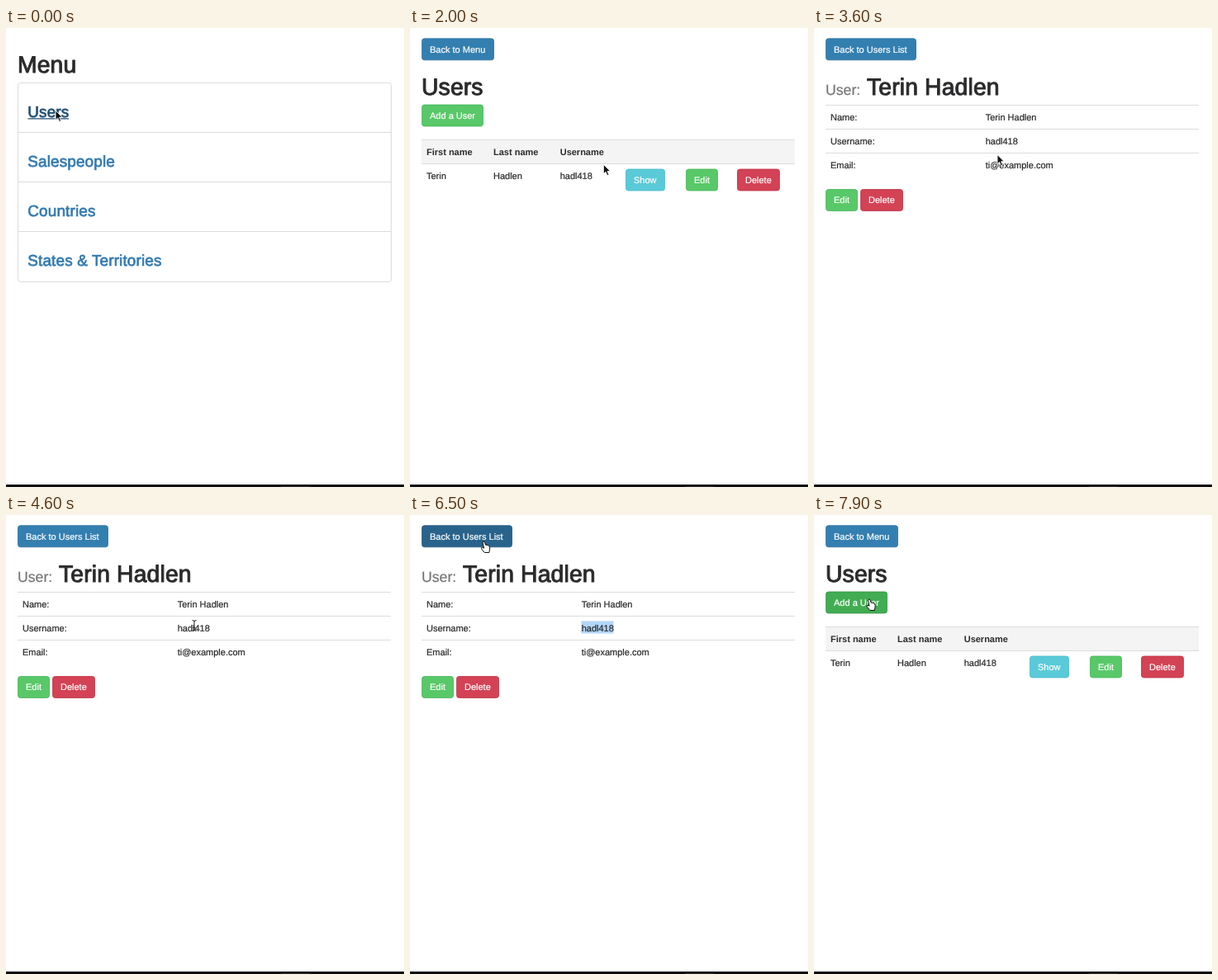
An HTML page for the animation above (8000 ms loop, 482x556 px).

```html
<!DOCTYPE html>
<html lang="en">
<head>
<meta charset="utf-8">
<title>User admin</title>
<style>
  html, body { margin: 0; width: 100%; height: 100%; overflow: hidden; background: #fff; }
  svg { display: block; font: 11px "Liberation Sans", Arial, sans-serif; fill: #2b2b2d; text-rendering: geometricPrecision; }
  text { white-space: pre; stroke: currentColor; stroke-width: .22px; color: #2b2b2d; }
  .h1 { font-size: 28.3px; letter-spacing: .15px; stroke-width: 1px; }
  .small { font-size: 17.7px; fill: #777; color: #777; }
  .link { font-size: 18.9px; letter-spacing: .15px; fill: #337ab0; color: #337ab0; stroke-width: .7px; }
  .link.over { fill: #214f72; color: #214f72; }
  .th { font-weight: bold; stroke: none; }
  .btn text { fill: #fff; color: #fff; }
  .rule { stroke: #dcdcdc; fill: none; }
</style>
</head>
<body>
<svg id="stage" width="482" height="556" viewBox="0 0 482 556"></svg>
<script>
const LOOP = 8000, STEP = 100;
const first = 'Terin', last = 'Hadlen', login = 'hadl418', mail = 'ti@example.com';

// fill and border per button state
const colors = {
  blue: ['#337fb0', '#2d709d'], blueOver: ['#28638b', '#22567a'], blueDown: ['#224f6f', '#183c56'],
  green: ['#58c868', '#4bb45b'], greenOver: ['#42ac53', '#389747'],
  cyan: ['#5acad8', '#48bccb'], cyanOver: ['#34b6c7', '#2aa5b6'], cyanDown: ['#20a5b5', '#188391'],
  red: ['#d34255', '#bf3448']
};

const text = (x, y, s, cls = '') => `<text x="${x}" y="${y}" class="${cls}">${s}</text>`;
const rule = y => `<path class="rule" d="M14 ${y}H466"/>`;
const button = (x, y, w, label, color, id = '') => {
  const [fill, edge] = colors[color];
  return `<g class="btn"><rect id="${id}" x="${x + .5}" y="${y + .5}" width="${w - 1}" height="26" rx="3"
    fill="${fill}" stroke="${edge}" stroke-width=".8"/>${text(x + 10, y + 17.3, label)}</g>`;
};

const links = ['Users', 'Salespeople', 'Countries', 'States &amp; Territories'];
const menu = text(14, 53.6, 'Menu', 'h1') +
  '<rect class="rule" x="14.5" y="66.5" width="452" height="241" rx="3"/>' +
  [126.5, 186.5, 246.5].map(rule).join('') +
  links.map((s, i) => text(26.3, 108 + 60 * i, s, i ? 'link' : 'link over')).join('') +
  '<path d="M26.5 109.8H76" stroke="#214f72" stroke-width="1.2"/>';

const columns = [[20, 'First name', first], [101, 'Last name', last], [181.7, 'Username', login]];
const list = button(14, 12.3, 88, 'Back to Menu', 'blue') +
  text(14, 80.5, 'Users', 'h1') +
  button(14, 92.5, 75, 'Add a User', 'green', 'add') +
  '<path d="M14 135H466V165H14z" fill="#f4f4f4"/>' + rule(135.5) + rule(164.5) +
  columns.map(([x, head, cell]) => text(x, 154, head, 'th') + text(x, 183, cell)).join('') +
  button(261, 170.5, 48, 'Show', 'cyan', 'show') +
  button(334, 170.5, 39, 'Edit', 'green') +
  button(396, 170.5, 52, 'Delete', 'red');

const rows = [['Name:', first + ' ' + last], ['Username:', login], ['Email:', mail]];
const user = button(14, 12.3, 110, 'Back to Users List', 'blue', 'back') +
  text(14, 80.5, 'User:', 'small') + text(64, 80.5, first + ' ' + last, 'h1') +
  '<rect id="mark" x="207.5" y="128.5" width="39" height="15" fill="#b2d6fb"/>' +
  rows.map(([k, v], i) => rule(93.5 + 29 * i) + text(20, 112 + 29 * i, k) + text(207.7, 112 + 29 * i, v)).join('') +
  button(14, 195, 39, 'Edit', 'green') + button(56, 195, 52, 'Delete', 'red');

const cursors = {
  arrow: '<path d="M0 0V11.5L2.7 9 4.6 13.4 6.6 12.5 4.7 8.2H8.3z" fill="#111" stroke="#fff" stroke-width=".9"/>',
  hand: `<path d="M-1.4 1.2Q-1-.6.6.2L2.2 4.4 3.6 4.2 5 4.7 6.4 5.4Q7.6 7 7 10L6.3 13.5H.8
    L-2.7 9.3Q-3.8 7.4-2 7.2L0 8.2z" fill="#fff" stroke="#111"/>`,
  beam: `<path d="M-2.5-6.5Q0-6.5 0-4.5Q0-6.5 2.5-6.5M0-4.5V4.5M-2.5 6.5Q0 6.5 0 4.5Q0 6.5 2.5 6.5M-1.5 2.5H1.5"
    fill="none" stroke="#222"/>`
};

const group = (id, body) => `<g id="${id}">${body}</g>`;
const stage = document.getElementById('stage');
stage.innerHTML = group('menu', menu) + group('list', list) + group('user', user) +
  '<path d="M0 553H482V556H0z" fill="#08080a"/><path d="M333 554.5H368V556H333z" fill="#222"/>' +
  group('pointer', Object.entries(cursors).map(([id, body]) => group(id, body)).join(''));
const $ = id => document.getElementById(id);

// [time, value] tracks that switch hard
const views = [[0, 'menu'], [1100, 'list'], [2900, 'user'], [7500, 'list']];
const kinds = [[0, 'arrow'], [2200, 'hand'], [2600, 'arrow'], [4300, 'beam'], [5600, 'arrow'],
  [6200, 'hand'], [7100, 'arrow'], [7800, 'hand']];
const states = {
  add: [[0, 'green'], [7800, 'greenOver']],
  show: [[0, 'cyan'], [2200, 'cyanOver'], [2500, 'cyanDown'], [2900, 'cyan']],
  back: [[0, 'blue'], [6100, 'blueOver'], [7000, 'blueDown']]
};
// [time, x, y] of the pointer's hot spot
const path = [[0, 60, 100], [1400, 60, 100], [1500, 100, 120], [1900, 214, 160], [2200, 275, 176], [2300, 277, 173],
  [3100, 277, 173], [3400, 238, 166], [3600, 222, 153.5], [4000, 222, 153.5], [4200, 225, 112], [4400, 228, 134],
  [5500, 228, 134], [5600, 228, 148], [5800, 223, 144], [6000, 150, 85], [6200, 90, 33], [6400, 90, 33],
  [6600, 89, 31], [7500, 89, 31], [7800, 68, 98], [7900, 67, 102], [LOOP, 67, 102]];

const pick = (track, t) => track.filter(k => k[0] <= t).pop()[1];
const spot = t => {
  const i = path.findIndex(k => k[0] > t);
  const [t0, x0, y0] = path[i - 1], [t1, x1, y1] = path[i];
  const p = (t - t0) / (t1 - t0);
  return [x0 + (x1 - x0) * p, y0 + (y1 - y0) * p];
};
const only = (ids, on) => ids.forEach(id => { $(id).style.display = id === on ? '' : 'none'; });

function draw(now) {
  const t = Math.floor(now % LOOP / STEP) * STEP;
  only(['menu', 'list', 'user'], pick(views, t));
  only(Object.keys(cursors), pick(kinds, t));
  for (const id in states) {
    const [fill, edge] = colors[pick(states[id], t)];
    $(id).setAttribute('fill', fill);
    $(id).setAttribute('stroke', edge);
  }
  $('mark').style.display = t >= 4900 ? '' : 'none';
  $('pointer').setAttribute('transform', `translate(${spot(t)})`);
}

const start = performance.now();
const tick = () => {
  draw(Math.max(0, performance.now() - start));
  requestAnimationFrame(tick);
};
tick();
</script>
</body>
</html>
```
